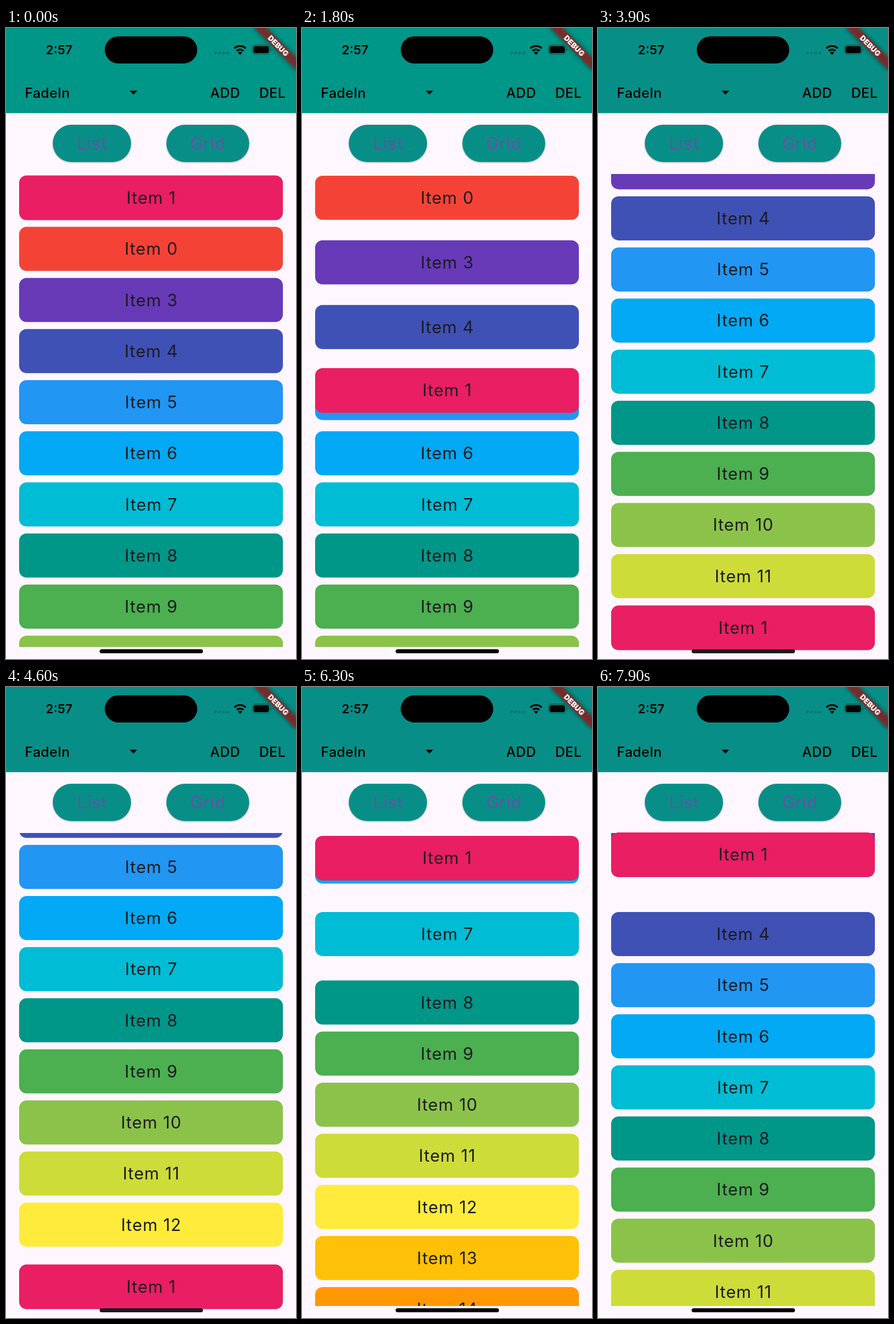
Recreate the animation shown at these times as an HTML page. Size 508 px wide and 1102 px high, loop 8000 ms.

```html
<!DOCTYPE html>
<html lang="en">
<head>
<meta charset="utf-8">
<style>
  html, body { margin: 0; width: 508px; height: 1102px; overflow: hidden; background: #fef7ff; }
  body { position: relative; font: 400 29.5px Inter, Roboto, sans-serif; color: #1d1b20; }
  svg, #list, .card, .button, #home { position: absolute; }
  #bar { fill: #009688; }
  #bar.scrolled { fill: #078f87; }
  #list { top: 254.5px; width: 508px; height: 826.5px; overflow: hidden; }
  .card, .button { box-sizing: border-box; padding-left: 1px; text-align: center; letter-spacing: 1px; }
  .card { left: 23.3px; top: 0; width: 461.4px; height: 77.6px; border-radius: 13px; line-height: 77.6px; }
  .button { top: 169.4px; height: 64.7px; line-height: 64.7px; border-radius: 33px; background: #078f87;
    color: #6750a4; box-shadow: 0 1px 3px #0005; }
  #home { left: 164px; top: 1085px; width: 181px; height: 6.5px; border-radius: 4px; background: #000; }
  #home.dim { background: #1c191e; }
</style>
</head>
<body>
<svg width="508" height="150">
  <defs><filter id="blur" x="-20%" y="-100%" width="140%" height="300%"><feGaussianBlur stdDeviation="4"/></filter></defs>
  <rect id="bar" width="508" height="148.700"/>
  <rect x="173" y="14.500" width="162" height="47.500" rx="23.750"/>
  <text x="69.500" y="46" font-size="22" font-weight="600">2:57</text>
  <path d="M367 43.500h24" stroke="#00736a" stroke-width="4.500" stroke-linecap="round" stroke-dasharray="0 7.200"/>
  <path d="M400 35.500a14.500 14.500 0 0 1 20 0M404 40a9 9 0 0 1 12 0" fill="none" stroke="#000" stroke-width="3.200"/>
  <path d="M410 47l-3.700-4a5.500 5.500 0 0 1 7.400 0z"/>
  <rect x="431.500" y="29.500" width="31" height="16.500" rx="5" fill="none" stroke="#00594f"/>
  <rect x="433.500" y="31.500" width="27" height="12.500" rx="3.500"/>
  <path d="M464.500 35.500q3 2.300 0 5z" fill="#00594f"/>
  <g font-size="24" font-weight="500" letter-spacing=".3">
    <text x="33" y="121.500">FadeIn</text>
    <text x="357.500" y="121.500" fill="#000">ADD</text>
    <text x="443.500" y="121.500" fill="#000">DEL</text>
  </g>
  <path d="M216.500 109.500h13.500l-6.750 6.750z"/>
  <g transform="translate(508 0) rotate(45)">
    <rect x="-52" y="36.200" width="104" height="15.500" fill="#0008" filter="url(#blur)"/>
    <rect x="-52" y="36.200" width="104" height="15.500" fill="#b71c1c" fill-opacity=".63"/>
    <text y="48.600" font-size="13" font-weight="900" fill="#fff" text-anchor="middle">DEBUG</text>
  </g>
</svg>
<div class="button" style="left:82px;width:137px">List</div>
<div class="button" style="left:280.500px;width:145.500px">Grid</div>
<div id="list"></div>
<div id="home"></div>
<script>
const LOOP = 8000, STEP = 100, SETTLE = 250;
const TOP = 257.5, PITCH = 89.25, HEIGHT = 77.6, VIEW_TOP = 254.5;
const COLORS = ['#f44336', '#e91e63', '#9c27b0', '#673ab7', '#3f51b5', '#2196f3', '#03a9f4', '#00bcd4',
  '#009688', '#4caf50', '#8bc34a', '#cddc39', '#ffeb3b', '#ffc107', '#ff9800', '#ff5722'];

// Finger path of the dragged card: [time, top]
const DRAG = [[0, TOP], [800, TOP], [1200, 261], [1300, 261], [1400, 265], [1550, 311], [1634, 398],
  [1680, 487], [1755, 576], [1800, 594], [1900, 625], [2600, 942], [2900, 965], [3000, 1008.6],
  [5400, 1008.6], [5600, 930], [6050, 460], [6146, 373], [6215, 284], [6300, 260], [6400, 254], [LOOP, 254]];

const clamp = x => Math.min(1, Math.max(0, x));
const ease = x => (x = clamp(x)) * x * (3 - 2 * x);

function dragTop(t) {
  const i = DRAG.findIndex(p => p[0] > t);
  const [t0, y0] = DRAG[i - 1], [t1, y1] = DRAG[i];
  return y0 + (y1 - y0) * (t - t0) / (t1 - t0);
}

// Auto-scroll while the card is held at the lower, then the upper edge
const SPEED = 0.1533;
const scroll = t => Math.min(370.2, SPEED * Math.max(0, t - 2970)) - SPEED * Math.max(0, t - 6351);
const slotTop = (slot, t) => TOP + slot * PITCH - scroll(t);

function firstTime(from, test) {
  for (let t = from; t < LOOP; t += 2) if (test(t)) return t;
  return Infinity;
}

function addCard(number, parent) {
  const card = document.createElement('div');
  card.className = 'card';
  card.textContent = 'Item ' + number;
  card.style.background = COLORS[number];
  parent.append(card);
  return card;
}

const list = document.getElementById('list');
const home = document.getElementById('home');
const bar = document.getElementById('bar');

// A card moves up once the dragged edge passes its middle, and down again on the way back
const cards = COLORS.map((_, n) => n).filter(n => n !== 1 && n !== 2).map((number, rank) => {
  const up = firstTime(0, t => dragTop(t) + HEIGHT > slotTop(rank + 1, t) + HEIGHT / 2);
  const down = firstTime(up, t => dragTop(t) < slotTop(rank, t) + HEIGHT / 2);
  return { el: addCard(number, list), rank, up, down };
});
const dragged = addCard(1, document.body);
document.body.append(home);

const place = (el, y) => el.style.transform = `translateY(${y}px)`;

function draw(now) {
  const t = Math.floor(now % LOOP / STEP) * STEP;
  for (const { el, rank, up, down } of cards) {
    const shift = 1 - ease((t - up) / SETTLE) + ease((t - down) / SETTLE);
    place(el, slotTop(rank + shift, t) - VIEW_TOP);
  }
  const y = dragTop(t);
  place(dragged, y);
  home.className = y > 1008 ? 'dim' : '';
  bar.setAttribute('class', scroll(t) > 0 ? 'scrolled' : '');
  requestAnimationFrame(draw);
}
draw(0);
</script>
</body>
</html>
```
